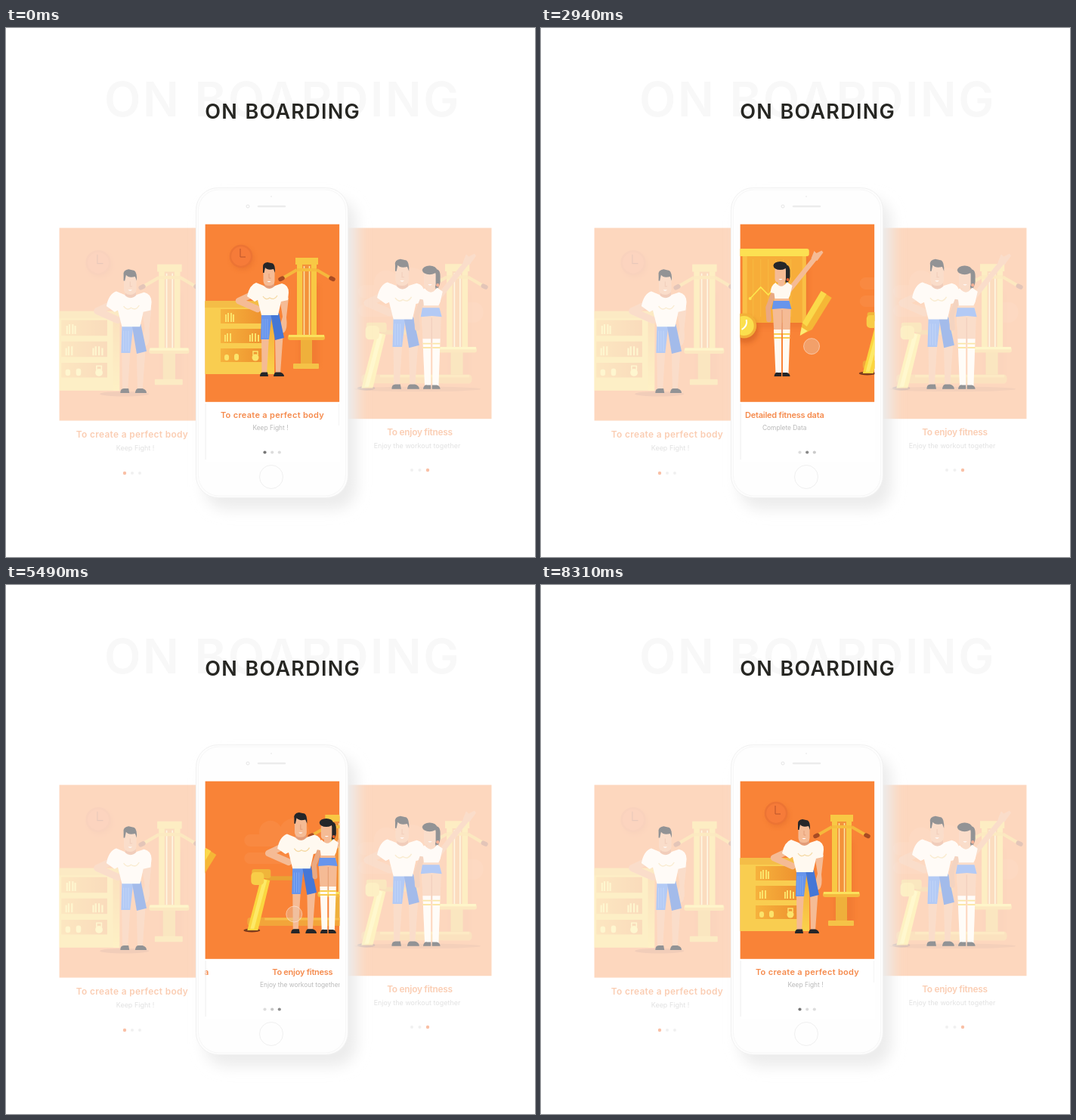
An HTML page that plays this animation: 700 by 700 pixels, repeating every 8.34 s.

```html
<!DOCTYPE html>
<html lang="en">
<head>
<meta charset="utf-8">
<title>On boarding</title>
<style>
html, body { margin: 0; width: 100%; height: 100%; overflow: hidden; background: #fff }
svg { display: block; width: 100vw; height: 100vh }
text { font-family: Inter, Roboto, sans-serif; text-anchor: middle }
.title { font-size: 11px; font-weight: 600; fill: #f58a4c }
.sub { font-size: 8.4px; fill: #b9b9b9 }
.skin { fill: #f5bb95 }
.dark { fill: #252629 }
.arm { fill: none; stroke: #f5bb95; stroke-linecap: round; stroke-linejoin: round }
</style>
</head>
<body>
<svg viewBox="0 0 700 700">
<defs>
  <clipPath id="screen"><rect x="263.400" y="259.400" width="178" height="314.600"/></clipPath>
  <clipPath id="picture"><rect x="263.400" y="259.400" width="178" height="235.400"/></clipPath>
  <filter id="blur" x="-30%" y="-30%" width="160%" height="160%"><feGaussianBlur stdDeviation="9"/></filter>
  <filter id="soft" x="-50%" y="-50%" width="200%" height="200%"><feGaussianBlur stdDeviation="3"/></filter>
  <linearGradient id="gold" x2="0" y2="1"><stop stop-color="#f3a436"/><stop offset="1" stop-color="#fad24c"/></linearGradient>
  <linearGradient id="niche" x2="1"><stop stop-color="#f6b23d"/><stop offset="1" stop-color="#ee922f"/></linearGradient>

  <g id="clock">
    <circle cx="313" cy="305" r="15" fill="#c9541d" opacity=".25" filter="url(#soft)"/>
    <circle cx="311" cy="302" r="14" fill="#f67b39" stroke="#ec7434" stroke-width="2.500"/>
    <path d="M310 292V303H317" fill="none" stroke="#b9552a"/>
  </g>

  <g id="shelf">
    <rect x="240" y="362" width="115" height="96" fill="#f9cd50"/>
    <rect x="347" y="370" width="8" height="88" fill="url(#gold)"/>
    <rect x="240" y="361" width="115" height="9" fill="#f4bd47"/>
    <path d="M284 372h56v19h-56zM284 398h56v19h-56zM284 424h56v18h-56z" fill="url(#niche)"/>
    <g fill="#fbe36b">
      <path d="M290 379h2v10h-2zM293 377h2v12h-2zM297 377h2v12h-2zM300 379h2v10h-2zM289 406h2v9h-2zM292 404h2v11h-2zM296 404h2v11h-2zM322 406h2v9h-2zM325 404h2v11h-2zM329 404h2v11h-2zM333 406h2v9h-2z"/>
      <rect x="289" y="432" width="6" height="8" rx="3"/><rect x="302" y="431" width="6" height="9" rx="3"/>
      <circle cx="330" cy="436" r="4.500"/><path d="M327 433v-5h6v5" fill="none" stroke="#fbe36b" stroke-width="1.500"/>
    </g>
  </g>

  <g id="machine">
    <path d="M388 338H414V448H388z" fill="#c9541d" opacity=".15" filter="url(#soft)"/>
    <path d="M390 411h15v34h-15z" fill="#efb03b"/>
    <rect x="380" y="444" width="34" height="7" rx="1" fill="#f5c247"/>
    <path d="M385 306h26v102h-26z" fill="#f3923a"/>
    <path d="M385 306h7v102h-7zM404 306h7v102h-7z" fill="#f8c944"/>
    <path d="M394.500 315V407M401.500 315V407" stroke="#fbe3a4" stroke-width="1.500"/>
    <rect x="383" y="304" width="30" height="9" fill="#f8c844"/>
    <path d="M366 331L385 320M430 331L411 320" stroke="#f5b83c" stroke-width="4"/>
    <path d="M385 320H411" stroke="#f6bd3e" stroke-width="4"/>
    <path d="M363 332.500L366 331M433 332.500L430 331" stroke="#a84b23" stroke-width="5.500" stroke-linecap="round"/>
    <rect x="373" y="406" width="49" height="7" rx="3" fill="#f5b93f"/>
    <path d="M374 407.500H421" stroke="#fbe15c" stroke-width="3"/>
  </g>

  <g id="treadmill">
    <rect x="281" y="440" width="136" height="11" rx="4" fill="#f2a53a"/>
    <path d="M304 442H414" stroke="#f8bd4a" stroke-width="3"/>
    <ellipse cx="287" cy="457" rx="11" ry="2.500" fill="#7c3c1d"/>
    <path d="M308 388H348" stroke="#e9a234" stroke-width="5.500" stroke-linecap="round"/>
    <path d="M299 388L311 391L295 457H281z" fill="#fbd63f"/>
    <path d="M302 389L307 391L290 455H285z" fill="#fde967"/>
    <rect x="287" y="376" width="25" height="12" rx="3" fill="#f0b53a"/>
    <rect x="286" y="380" width="17" height="17" rx="5" fill="#f8cd48"/>
  </g>

  <g id="clouds" fill="#fff" opacity=".055">
    <path d="M285 346a8 8 0 0 1 0-16h12a15 15 0 0 1 28-10a20 20 0 0 1 38 10h8v16z"/>
    <rect x="277" y="354" width="60" height="15" rx="7.500"/><rect x="385" y="351" width="46" height="25" rx="12"/>
  </g>

  <g id="board">
    <path d="M300 303H385V396H305z" fill="#c9541d" opacity=".2" filter="url(#soft)"/>
    <path d="M298 300h84v90h-84z" fill="#f7ad39"/>
    <path d="M298 300h6v90h-6zM377 300h5v90h-5z" fill="#fabf45"/>
    <path d="M312 306V382M322 306V382M332 306V382M342 306V382M352 306V382M362 306V382" stroke="#f9c64a" opacity=".5"/>
    <rect x="293" y="292" width="93" height="10" rx="3" fill="#fce052"/>
    <path d="M308 358L322 343L332 353L348 336" fill="none" stroke="#fde74d" stroke-width="1.600"/>
    <circle cx="308" cy="358" r="2" fill="#fde74d"/>
    <circle cx="302" cy="400" r="17" fill="#b84a17" opacity=".4" filter="url(#soft)"/>
    <path d="M287 376L295 380M293 373L283 380" stroke="#f8cb45" stroke-width="4"/>
    <circle cx="300" cy="394" r="16.500" fill="#f3b038"/><circle cx="300" cy="394" r="13" fill="#fbdf4d"/>
    <path d="M303 386Q305 394 297 399" fill="none" stroke="#fff" stroke-width="2"/>
    <path d="M374 407L377 390L402 348L416 357L390 399z" fill="#f5b736"/>
    <path d="M377 390L402 348L409 352L383 395z" fill="#fbd94a"/>
    <path d="M374 407L376 396L384 401z" fill="#fdeb72"/>
  </g>

  <path id="manArm" class="skin" d="M362 357H374L371 383Q373 398 368 403Q361 405 362 396L366 382z"/>
  <g id="man">
    <path class="skin" d="M338 408H348L345 457H338.500zM356 408H366.500L363 457H357z"/>
    <path class="dark" d="M336 461Q336 455 341 455.500L346 455.500L347 461zM354 461Q355 455 358 455.500L363 455.500Q368 457 368 461z"/>
    <path d="M338 377H352L348 412H337z" fill="#6795ec"/>
    <path d="M340 385V410M343 385V410M346 385V410" stroke="#88adf2" stroke-width=".8"/>
    <path d="M350 377H361L368 410L356 413z" fill="#4577d6"/>
    <path class="arm" stroke-width="8.500" d="M325 353L308 361L333 372"/>
    <path class="skin" d="M342 330H355V348H342z"/>
    <path d="M342 338H355V343Q348 347 342 342z" fill="#e39c78"/>
    <path d="M341 341Q348 349 356 341L365 338Q374 340 374 350L373 360L364 362L360 380H338L333 360L329 362L319 355Q322 340 331 337z" fill="#fff9f0"/>
    <path d="M340 355Q344 361 349 357Q355 361 359 354" fill="none" stroke="#f5d9a4" stroke-width="1.300"/>
    <path class="skin" d="M340.500 316H355.500V335Q355 341 348 341Q341 341 340.500 335z"/>
    <path d="M348 325V331H350.500" fill="none" stroke="#e59d77"/>
    <path d="M345.500 335H350.500Q348 337.500 345.500 335" fill="#fff"/>
    <path class="dark" d="M340 324V317Q339 311 346 310L353 311.500Q356.500 314 356 324L354 319Q346 321 343 317L341.500 324z"/>
  </g>

  <g id="woman">
    <path class="arm" stroke-width="6.500" d="M328 347L361 306"/>
    <path class="skin" d="M357 305L361 295L364 298L371 294.500L373 297L365 308z"/>
    <path class="arm" stroke-width="6.500" d="M308 349L300 370L301 386" style="stroke:#eaa982"/>
    <path class="dark" d="M321 314Q330 311 329 325Q330 334 324 339Q321 330 323 322z"/>
    <path class="skin" d="M313 330H322V345H313zM309 354H327L330 372L329 404H319V372L318 404H308L306 372z"/>
    <path d="M318.500 373V404" stroke="#e39c78"/>
    <path d="M307.500 399H317.500V458H310zM319.500 399H329L327 458H319.500z" fill="#fffaf2"/>
    <path d="M307.500 405H317.500M319.500 405H329M307.500 410H317.500M319.500 410H329" stroke="#f8cc50" stroke-width="1.800"/>
    <path class="dark" d="M308 461Q309 455 313 456H317.500V461zM319 461V456H325Q329 457 329 461z"/>
    <path d="M307 361H328L331 372L319 371L305 372z" fill="#6795ec"/>
    <path d="M310 337Q318 347 325 336L332 341L329 354L327 358H309L308 351L303 350Q304 340 310 337z" fill="#fff9f0"/>
    <rect class="skin" x="309" y="315" width="14.500" height="22" rx="5"/>
    <path d="M314 332H319Q316.500 334.500 314 332" fill="#fff"/>
    <ellipse class="dark" cx="316" cy="314.500" rx="9" ry="5.500"/>
    <circle cx="326" cy="333" r="2" fill="#e8602c"/>
  </g>

  <g id="duo">
    <use href="#man" transform="translate(339 461) scale(1.06) translate(-347 -461)"/>
    <use href="#woman" x="58"/>
  </g>
  <g id="gym"><use href="#clouds"/><use href="#machine" x="1"/><use href="#treadmill"/></g>
  <rect id="wall" x="263.400" y="259.400" width="178" height="235.400" fill="#f98337"/>
</defs>

<rect width="700" height="700" fill="#fff"/>
<text x="366" y="116.500" font-size="63" font-weight="600" letter-spacing="2.500" fill="#f8f8f8">ON BOARDING</text>
<text x="366" y="119.500" font-size="27" font-weight="600" letter-spacing="1.250" word-spacing="1.500" fill="#262622">ON BOARDING</text>

<!-- faded side pages; people are laid on once more for stronger tones -->
<g transform="translate(71 265) scale(1.085) translate(-264 -260)" clip-path="url(#picture)">
  <g opacity=".32">
    <use href="#wall"/><use href="#clock"/><use href="#machine"/><use href="#shelf" x="-18"/>
    <ellipse cx="343" cy="462" rx="30" ry="3" fill="#b9501c" opacity=".6"/>
    <use href="#manArm" x="2"/><use href="#man" x="2"/>
  </g>
  <g opacity=".25"><use href="#manArm" x="2"/><use href="#man" x="2"/></g>
</g>
<g transform="translate(452 265) scale(1.075) translate(-264 -260)" clip-path="url(#picture)">
  <g opacity=".32">
    <use href="#wall"/><use href="#gym"/>
    <ellipse cx="350" cy="458" rx="78" ry="3" fill="#b9501c" opacity=".45"/>
    <use href="#duo" x="-9" y="-3"/>
  </g>
  <use href="#duo" x="-9" y="-3" opacity=".25"/>
</g>
<g opacity=".42">
  <text class="title" x="167" y="542" style="font-size:11.900px" letter-spacing=".33">To create a perfect body</text>
  <text class="sub" x="171" y="559" style="font-size:9px">Keep Fight !</text>
  <text class="title" x="547.500" y="539" style="font-size:11.900px" letter-spacing="-.27">To enjoy fitness</text>
  <text class="sub" x="544" y="556" style="font-size:9px">Enjoy the workout together</text>
  <g fill="#ddd">
    <circle cx="157" cy="589" r="2.200" fill="#f26a2c"/><circle cx="167" cy="589" r="2"/><circle cx="177" cy="589" r="2"/>
    <circle cx="537" cy="585" r="2"/><circle cx="547.500" cy="585" r="2"/><circle cx="558" cy="585" r="2.200" fill="#f26a2c"/>
  </g>
</g>

<rect x="262" y="226" width="202" height="411" rx="30" fill="#ececec" filter="url(#blur)"/>
<rect x="251.500" y="211.500" width="201" height="410" rx="29" fill="#fdfdfd" stroke="#f1f1f1"/>
<rect x="254.500" y="214" width="195" height="405" rx="27" fill="#fefefe" stroke="#f7f7f7"/>
<path d="M334 236H369" stroke="#ececec" stroke-width="2.500" stroke-linecap="round"/>
<g fill="none" stroke="#e6e6e6"><circle cx="320" cy="236" r="2"/><circle cx="351" cy="594" r="15.500" stroke="#f0f0f0"/></g>
<circle cx="351" cy="223" r="1" fill="#eee"/>

<g clip-path="url(#screen)">
  <rect x="263" y="259" width="179" height="316" fill="#fff"/>
  <use href="#wall"/>
  <g class="page">
    <use href="#clock"/><use href="#shelf"/><use href="#machine"/>
    <g class="people"><use href="#manArm"/><use href="#man"/></g>
    <text class="title" x="352.500" y="516" letter-spacing=".3">To create a perfect body</text>
    <text class="sub" x="350" y="532">Keep Fight !</text>
    <path d="M440.500 497V526" stroke="#f5f5f5"/>
  </g>
  <g class="page">
    <use href="#board"/>
    <g class="people"><use href="#woman" x="33"/></g>
    <text class="title" x="353.500" y="516" letter-spacing="-.22">Detailed fitness data</text>
    <text class="sub" x="353.500" y="532">Complete Data</text>
  </g>
  <g class="page">
    <use href="#gym"/>
    <g class="people"><use href="#duo"/></g>
    <text class="title" x="354" y="516" letter-spacing="-.25">To enjoy fitness</text>
    <text class="sub" x="351" y="532">Enjoy the workout together</text>
  </g>
  <path d="M264 497V571" stroke="#ececec"/>
  <circle class="dot" cx="342.500" cy="561.500" r="2.100"/>
  <circle class="dot" cx="352.200" cy="561.500" r="2.100"/>
  <circle class="dot" cx="361.800" cy="561.500" r="2.100"/>
  <circle id="touch" r="10.500" fill="#e9c3a8" fill-opacity=".45" stroke="#fff" stroke-opacity=".45"/>
</g>
</svg>

<script>
const LOOP = 8340, PITCH = 176, SLIDE = 1000;
// start time and direction of each swipe
const swipes = [[1031, 1], [2664, 1], [5182, -1], [6817, -1]];
const parallax = [1.7, 1.04, 1.3];
const all = q => [...document.querySelectorAll(q)];
const pages = all('.page'), people = all('.people'), dots = all('.dot');
const touch = document.getElementById('touch');
const clamp = v => Math.min(1, Math.max(0, v));
const ease = v => (1 - Math.cos(Math.PI * clamp(v))) / 2;

function placeTouch(p, dir) {
  const forward = dir > 0, start = forward ? 0 : -.2;
  const k = ease((p - start) / (forward ? .78 : .8));
  const x = forward ? 390 - 114 * k : 290 + 129 * k;
  const y = forward ? 424 + 11 * k ** 3 - 4 * Math.sin(Math.PI * k) : 425 + 21 * k * k;
  touch.setAttribute('cx', x);
  touch.setAttribute('cy', y);
  touch.setAttribute('opacity', clamp((p - start) / .12 + 1) * clamp(1 - (p - start - 1) / .2));
}

function draw(t) {
  const scroll = swipes.reduce((s, [at, dir]) => s + dir * ease((t - at) / SLIDE), 0);
  pages.forEach((page, i) => {
    const d = (i - scroll) * PITCH;
    page.setAttribute('transform', `translate(${d})`);
    people[i].setAttribute('transform', `translate(${d * (parallax[i] - 1)})`);
    const grey = Math.round(119 + 102 * clamp(Math.abs(i - scroll)));
    dots[i].setAttribute('fill', `rgb(${grey},${grey},${grey})`);
  });
  const [at, dir] = swipes.find(([s]) => t < s + 1250) || swipes[3];
  placeTouch((t - at) / SLIDE, dir);
}

const t0 = performance.now();
function tick() {
  draw((performance.now() - t0) % LOOP);
  requestAnimationFrame(tick);
}
tick();
</script>
</body>
</html>
```
